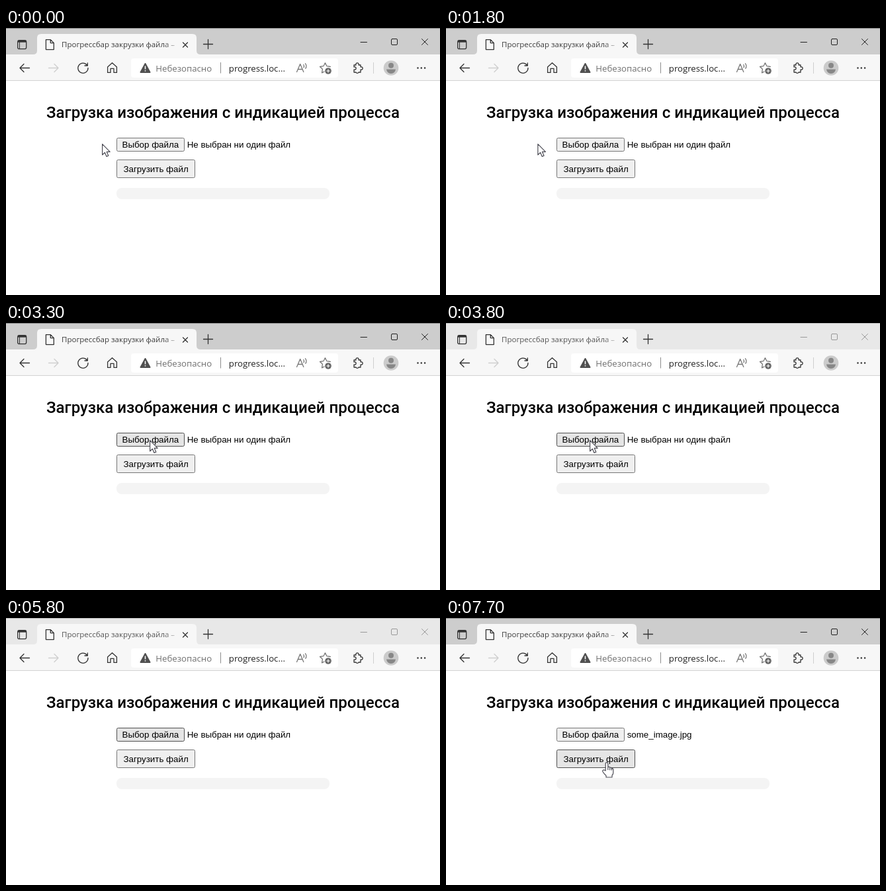
An HTML page that plays this animation: 656 by 404 pixels, repeating every 8 s.

```html
<!DOCTYPE html>
<html lang="ru">
<head>
<meta charset="utf-8">
<style>
  html, body { margin: 0; width: 100%; height: 100%; overflow: hidden; background: #fff; }
  svg { display: block; width: 656px; height: 404px; }
  text { font-family: "Liberation Sans", Arial, sans-serif; font-size: 13.333px; fill: #000; }
  .ui { font-family: "Open Sans", "Noto Sans", sans-serif; font-size: 13.2px; }
  .tab { font-size: 11.5px; }
  .title { font-family: Roboto, sans-serif; font-size: 24px; font-weight: 500; }
  .line { fill: none; stroke: #333; stroke-width: 1.3; stroke-linecap: round; stroke-linejoin: round; }
  .gray { stroke: #777; }
  .btn { fill: #efefef; stroke: #767676; }
  .btn.hover { fill: #e5e5e5; stroke: #4f4f4f; }
  .pointer { fill: #fff; stroke: #4c4c55; stroke-width: 1.2; stroke-linejoin: round; }
  #bar { fill: #cdcdcd; }
  #edge { fill: #858585; }
  #tab { fill: #3c3c3c; }
  #controls { stroke: #222; stroke-width: 1; }
  .inactive #bar { fill: #e8e8e8; }
  .inactive #edge { fill: #b5b5b5; }
  .inactive #tab { fill: #555; }
  .inactive #controls { stroke: #999; }
</style>
</head>
<body>
<svg id="stage" viewBox="0 0 656 404">
  <defs>
    <linearGradient id="fade" gradientUnits="userSpaceOnUse" x1="238" x2="266">
      <stop stop-color="#f7f7f7" stop-opacity="0"/><stop offset="1" stop-color="#f7f7f7"/>
    </linearGradient>
  </defs>

  <!-- title bar -->
  <rect id="bar" width="656" height="41"/>
  <rect id="edge" width="656" height="1"/>
  <path fill="#f7f7f7" d="M41 40Q47 40 47 34V15Q47 9 53 9H282Q288 9 288 15V34Q288 40 294 40V41H41Z"/>
  <g class="line">
    <rect x="17.7" y="18.7" width="13" height="13" rx="2.5"/>
    <path stroke-width="3" stroke-linecap="butt" d="M18 20.2H30.5"/>
    <path stroke-width="1" d="M20.5 21V31"/>
    <path d="M60.4 17.6H67.3L72.3 22.6V32.6H60.4ZM67.3 17.6V22.6H72.3"/>
    <path d="M267.5 22l7 7m0-7l-7 7M298.5 24.5h14m-7-7v14"/>
  </g>
  <text id="tab" class="ui tab" x="84" y="29.3">Прогрессбар закрузки файла –</text>
  <rect x="238" y="15" width="24" height="20" fill="url(#fade)"/>
  <g id="controls" class="line">
    <path d="M536 21.5h9.5M628.5 16.5l9 9m0-9l-9 9"/>
    <rect x="582.5" y="16.5" width="9" height="9" rx="1.5"/>
  </g>

  <!-- toolbar -->
  <rect y="40" width="656" height="39" fill="#f7f7f7"/>
  <rect y="79" width="656" height="1" fill="#d3d3d3"/>
  <rect x="189" y="46" width="313" height="29" rx="4" fill="#fff"/>
  <g class="line">
    <path d="M35.5 60.5H21m6-6l-6 6l6 6"/>
    <path stroke="#cfcfcf" d="M64.5 60.5H79m-6-6l6 6l-6 6"/>
    <path d="M122.4 56A7.6 7.6 0 1 0 124 60.5M123.3 52.8V57H119"/>
    <path d="M153.6 59L160.5 52.8L167.4 59V67.4H163V61.3H158V67.4H153.6Z"/>
    <path d="M526 56h3a2.2 2.2 0 1 1 4 0h3v3a2.2 2.2 0 1 1 0 4v4h-3a2.2 2.2 0 0 1-4 0h-3v-4a2.2 2.2 0 1 0 0-4Z"/>
    <path stroke-width="2.6" stroke-dasharray="0 5.3" d="M622.5 60.5h11"/>
  </g>
  <path fill="#505050" stroke="#505050" stroke-width="2" stroke-linejoin="round" d="M210.5 54l7 13h-14Z"/>
  <path stroke="#fff" stroke-width="1.5" d="M210.5 57.5v5m0 1.5v1.6"/>
  <text class="ui" x="226.3" y="65.5" style="fill:#707070">Небезопасно</text>
  <path stroke="#8c8c8c" d="M324.5 52V68.5"/>
  <text class="ui" x="336.8" y="65.5" style="fill:#222">progress.loc...</text>
  <g class="line gray">
    <path d="M439.5 66.5l5.2-12l5.1 12m-8.5-4h6.7M449.8 55.5q1.4 2 .2 4.3M452.5 53.8q2.7 3.5 .3 7.4"/>
    <path d="M481 66L477.5 67.8L478.4 62.3L474.5 58.5L479.9 57.7L482.4 52.8L484.9 57.7L490.3 58.5"/>
  </g>
  <circle cx="487" cy="65" r="4.8" fill="#666"/>
  <path stroke="#fff" stroke-width="1.2" d="M484.4 65h5.2m-2.6-2.6v5.2"/>
  <path stroke="#cfcfcf" d="M555.5 52V69"/>
  <circle cx="582" cy="60.5" r="11.3" fill="#cbcbcb"/>
  <circle cx="582" cy="56.8" r="4" fill="#878787"/>
  <path fill="#878787" d="M575 62.5h14q-1 6.5-7 6.5t-7-6.5Z"/>

  <!-- page -->
  <text class="title" x="328" y="136.3" text-anchor="middle">Загрузка изображения с индикацией процесса</text>
  <rect id="choose" class="btn" x="167.5" y="166.5" width="102" height="20" rx="2"/>
  <text x="175.5" y="181">Выбор файла</text>
  <text id="file" x="273.7" y="181"></text>
  <rect id="send" class="btn" x="167.5" y="199.5" width="118" height="27" rx="2"/>
  <text x="177.5" y="217.5">Загрузить файл</text>
  <rect x="167" y="242" width="322" height="17" rx="8" fill="#f4f4f4"/>

  <g id="cursor" class="pointer">
    <path id="arrow" d="M.6 .6V17L4.4 13.4L7 19.4L9.8 18.2L7.2 12.3H12.2Z"/>
    <path id="hand" d="M-1.8 13V2q0-1.4 1.8-1.4T1.8 2v5.5q1.5-1 2.9 .8q1.5-.8 2.7 1q2.4 0 2.4 2.2V16q0 2.5-1.8 4v3h-9v-2.5q-3-2.5-5.2-6.3q-.6-3 3-2ZM1.8 8v4m2.9-3v3.3m2.7-2.3v2.6"/>
  </g>
</svg>
<script>
const LOOP = 8000, STEP = 100;
const DIALOG_OPENS = 3600, POINTER_LEAVES = 5100, DIALOG_CLOSES = 5900;
const $ = id => document.getElementById(id);

const start = { x: 145, y: 175 };
const moves = [
  { from: 1500, to: 2000, x: 137, y: 175 },
  { from: 2300, to: 3100, x: 217, y: 177 },   // file button
  { from: 3900, to: 4300, x: 225, y: 203 },
  { from: 4300, to: 4600, x: 250, y: 303 },
  { from: 4700, to: 5000, x: 292, y: 376 },   // into the dialog
  { from: 5100, to: 5800, x: 205, y: 384 },   // out of sight
  { from: 5900, to: 6400, x: 117, y: 214 },
  { from: 6600, to: 7300, x: 214, y: 218 },   // upload button
  { from: 7400, to: 7700, x: 243, y: 218 }
];

const easeOut = k => 1 - (1 - k) ** 2;

function cursorAt(t) {
  return moves.reduce((p, m) => {
    const k = easeOut(Math.min(1, Math.max(0, (t - m.from) / (m.to - m.from))));
    return { x: p.x + (m.x - p.x) * k, y: p.y + (m.y - p.y) * k };
  }, start);
}

function isOver(id, p) {
  const b = $(id).getBBox();
  return p.x > b.x && p.x < b.x + b.width && p.y > b.y && p.y < b.y + b.height;
}

const show = (id, on) => $(id).setAttribute("visibility", on ? "visible" : "hidden");

function draw(now) {
  const t = Math.floor(now % LOOP / STEP) * STEP;
  const chosen = t >= DIALOG_CLOSES;
  const dialog = t >= DIALOG_OPENS && !chosen;
  const visible = t < POINTER_LEAVES || chosen;
  const p = cursorAt(t);
  const overSend = chosen && isOver("send", p);

  $("stage").classList.toggle("inactive", dialog);
  $("choose").classList.toggle("hover", dialog || isOver("choose", p));
  $("send").classList.toggle("hover", overSend);
  $("file").textContent = chosen ? "some_image.jpg" : "Не выбран ни один файл";

  $("cursor").setAttribute("transform", `translate(${p.x} ${p.y})`);
  show("arrow", visible && !overSend);
  show("hand", visible && overSend);
  requestAnimationFrame(draw);
}
requestAnimationFrame(draw);
</script>
</body>
</html>
```
